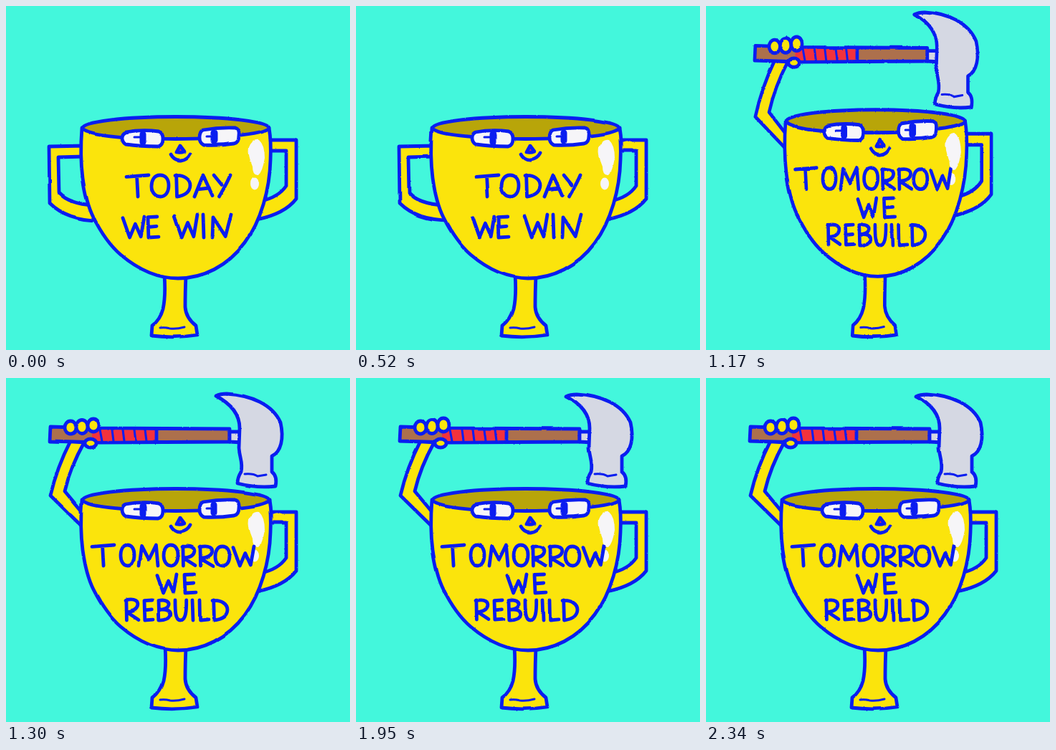
These frames come from a looping animation (480x480 px, 2470 ms). An HTML page:

```html
<!DOCTYPE html>
<html lang="en">
<head>
<meta charset="utf-8">
<title>Today we win, tomorrow we rebuild</title>
<style>
  html, body { margin: 0; height: 100%; overflow: hidden; background: #43f7dc; }
  svg { display: block; width: 100vw; height: 100vh; }
  .ink { stroke: #0a1df0; stroke-width: 4.8; stroke-linecap: round; stroke-linejoin: round; fill: none; }
  .gold { fill: #fbe40c; }
  .olive { fill: #b8a509; }
  .white { fill: #f6f5f8; }
  .steel { fill: #d5d8e3; }
  .wood { fill: #ad704c; }
  .red { fill: #f3323c; }
  .bare { stroke: none; }
  .thin { stroke-width: 3; }
  .pupil { stroke-width: 9; }
</style>
</head>
<body>
<svg viewBox="0 0 480 480" role="img" aria-label="Today we win. Tomorrow we rebuild.">
  <defs id="defs">
    <g id="rightHandle">
      <path class="gold" d="M364,187 L405,187 L405,269 Q389,290 350,298 L356,272 Q380,267 391,251 L391,202 L364,202 Z"/>
    </g>
    <g id="leftHandle">
      <path class="gold" d="M110,195 L60,196 L61,275 Q85,299 130,299 L122,278 Q88,276 74,261 L73,211 L110,210 Z"/>
    </g>
    <g id="cup">
      <path class="gold" d="M221,376 Q223,405 219,423 Q215,438 204,446 L203,460 Q235,464 267,459 L265,446 Q251,435 250,420 Q250,400 251,376 Z"/>
      <path class="thin" d="M215,449 Q222,448 229,450 Q238,451 249,448"/>
      <path class="gold" d="M106,170 C104,195 104,217 107,240 C110,262 114,279 122,295 C133,317 146,335 160,347 C186,369 214,380 240,380 C275,380 309,363 333,331 C356,300 368,255 369,215 C370,195 369,182 367,170 Z"/>
      <ellipse class="olive" cx="237" cy="170" rx="130" ry="15.500"/>
      <path class="white bare" d="M339,197 Q344,185 353,187 Q361,194 361,212 Q358,231 352,236 Q344,237 344,224 Q337,208 339,197 Z"/>
      <ellipse class="white bare" cx="347" cy="248" rx="6" ry="8.500"/>
    </g>
    <g id="face">
      <path class="white" d="M167,176 Q190,172 213,175 Q219,177 219,185 Q219,195 212,196 Q188,196 167,193 Q162,190 162,184 Q162,178 167,176 Z"/>
      <path class="white" d="M275,173 Q298,169 320,170 Q326,172 325,181 Q325,191 318,192 Q298,195 276,194 Q270,191 270,184 Q270,175 275,173 Z"/>
      <path class="thin" d="M179,183 L191,183 M280,182 L290,182"/>
      <path class="pupil" d="M191,179 L191,190 M290,177 L290,188"/>
      <path class="red" d="M238,204 L243,195 L249,203 Q244,205 238,204 Z"/>
      <path d="M230,207 Q235,216 244,215 Q253,214 257,206"/>
    </g>
    <g id="hammer">
      <path class="gold" d="M90,88 Q71,125 62,164 L112,213 L112,194 L82,158 Q90,124 109,90 Z"/>
      <path class="wood" d="M62,68 L130,70 L312,71 L312,89 L130,90 L61,88 Z"/>
      <path class="red bare" d="M120,72 L210,73 L210,87 L120,88 Z"/>
      <path class="thin" d="M131,72 L134,88 M148,72 L150,88 M163,72 L165,88 M179,72 L181,88 M194,72 L196,88"/>
      <path d="M210,72 L210,89"/>
      <path class="steel" d="M312,75 L330,75 L330,90 L312,89 Z"/>
      <path class="steel" d="M293,25 Q299,22 308,22 C342,24 372,37 383,62 C388,84 384,103 371,109 L371,131 Q379,137 376,151 Q350,154 323,147 Q323,139 328,131 C331,118 326,112 325,98 L326,70 C326,51 314,36 293,25 Z"/>
      <path class="thin" d="M333,134 Q345,133 351,137 L363,135"/>
      <ellipse class="gold" cx="118" cy="91" rx="8" ry="6"/>
      <ellipse class="gold" cx="90" cy="69" rx="8" ry="9"/>
      <ellipse class="gold" cx="106" cy="68" rx="8" ry="9.500"/>
      <ellipse class="gold" cx="122" cy="66" rx="8" ry="9"/>
    </g>
  </defs>
  <g id="squash">
    <g id="today" class="ink">
      <use href="#leftHandle"/><use href="#rightHandle"/><use href="#cup"/><use href="#face"/>
    </g>
    <g id="tomorrow" class="ink">
      <use href="#rightHandle"/><use href="#hammer"/><use href="#cup"/><use href="#face"/>
    </g>
  </g>
</svg>
<script>
const $ = id => document.getElementById(id);
const STEP = 130, STEPS = 19, SWITCH = 9, BOILS = 3;

// Brush lettering on a 100 x 100 grid
const GLYPHS = {
  T: 'M0,8L100,0M47,6L52,100',
  O: 'M50,0C15,0 0,25 0,52C0,80 22,100 52,100C82,100 100,78 100,48C100,20 82,0 50,0Z',
  D: 'M8,0L12,100M0,2C60,-2 100,20 100,48C98,80 60,96 12,100',
  A: 'M0,100L48,0L100,95M15,66L82,60',
  Y: 'M0,0L48,45M100,0C75,45 50,75 32,100',
  W: 'M0,6L32,100L58,35L84,96L100,0',
  E: 'M0,2L6,100M0,2L85,0M3,50L80,46M6,100L100,97',
  I: 'M0,0L50,100',
  N: 'M0,100L4,12L70,95L100,0',
  M: 'M0,100L14,5L52,70L90,0L100,100',
  R: 'M5,0L8,100M0,3C75,-8 100,10 92,30C85,48 50,58 10,60L100,98',
  B: 'M0,2L5,100M0,2C55,-5 90,8 82,25C75,42 40,46 5,48C75,42 100,55 98,72C95,92 50,102 5,100',
  U: 'M0,0C0,50 0,100 45,100C90,100 100,60 98,0',
  L: 'M0,0L5,100L100,96'
};

// spots holds x and width for each letter in turn
function letter(group, word, y, height, spots) {
  const d = [...word].map((ch, i) => {
    const x = spots[2 * i], width = spots[2 * i + 1];
    return GLYPHS[ch].replace(/(-?\d+),(-?\d+)/g, (_, a, b) =>
      `${(x + a * width / 100).toFixed(1)},${(y + b * height / 100).toFixed(1)}`);
  }).join('');
  group.insertAdjacentHTML('beforeend', `<path d="${d}"/>`);
}

const today = $('today'), tomorrow = $('tomorrow'), squash = $('squash');
letter(today, 'TODAY', 236, 30, [168, 31, 203, 24, 236, 21, 263, 25, 290, 23]);
letter(today, 'WE', 294, 29, [163, 30, 198, 15]);
letter(today, 'WIN', 291, 32, [235, 32, 275, 2, 288, 26]);
letter(tomorrow, 'TOMO', 233, 29, [120, 31, 160, 19, 186, 26, 220, 20]);
letter(tomorrow, 'RROW', 235, 27, [246, 18, 270, 19, 292, 20, 317, 29]);
letter(tomorrow, 'WE', 274, 26, [211, 27, 249, 16]);
letter(tomorrow, 'REBUILD', 310, 28, [167, 18, 193, 13, 213, 17, 236, 16, 260, 2, 270, 13, 288, 21]);

// Crayon edges: a slow wobble plus fine grain, one seed per redrawn pose
for (let i = 0; i < BOILS; i++) {
  $('defs').insertAdjacentHTML('beforeend', `
    <filter id="boil${i}" filterUnits="userSpaceOnUse" x="0" y="0" width="480" height="480" color-interpolation-filters="sRGB">
      <feTurbulence type="fractalNoise" baseFrequency=".025" seed="${i + 3}" result="slow"/>
      <feDisplacementMap in="SourceGraphic" in2="slow" scale="2.5" xChannelSelector="R" yChannelSelector="G" result="bent"/>
      <feTurbulence type="fractalNoise" baseFrequency=".5" numOctaves="2" seed="${i + 11}" result="fine"/>
      <feDisplacementMap in="bent" in2="fine" scale="2" xChannelSelector="R" yChannelSelector="G"/>
    </filter>`);
}

// Crouch just before the switch, spring up right on it
const SCALES = { [SWITCH - 1]: [1.034, 0.968], [SWITCH]: [0.96, 1.032] };

function draw() {
  const step = Math.floor(performance.now() / STEP) % STEPS;
  const early = step < SWITCH;
  const [sx, sy] = SCALES[step] || [1, 1];
  today.setAttribute('display', early ? 'inline' : 'none');
  tomorrow.setAttribute('display', early ? 'none' : 'inline');
  (early ? today : tomorrow).setAttribute('filter', `url(#boil${step % BOILS})`);
  squash.setAttribute('transform', `translate(233 462) scale(${sx} ${sy}) translate(-233 -462)`);
  requestAnimationFrame(draw);
}
draw();
</script>
</body>
</html>
```
